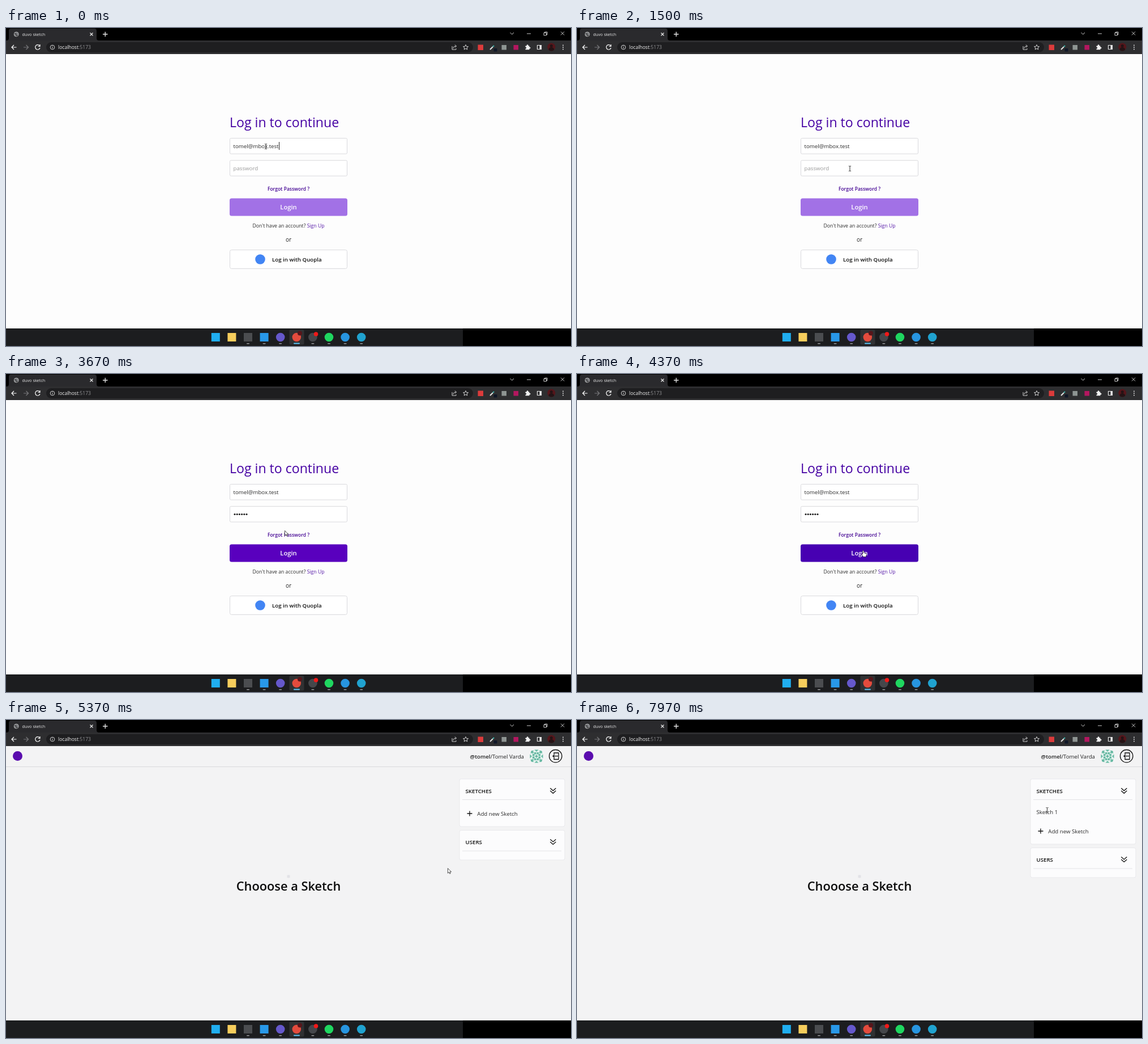
Write an HTML page that moves like this. It is 998 px wide and 561 px high and loops after 8 s.

```html
<!DOCTYPE html>
<html lang="en">
<head>
<meta charset="utf-8">
<title>Login and sketch list</title>
<style>
html, body { margin: 0; height: 100%; overflow: hidden; background: #000; }
svg { display: block; width: 998px; height: 561px; font: 9.7px "Open Sans", "Noto Sans", sans-serif; }
.line { fill: none; stroke: #e4e4e4; stroke-width: 1.2; }
.ink { fill: none; stroke: #111; stroke-width: 1.3; }
.field { fill: #fff; stroke: #dadadd; }
.card { fill: #fcfcfd; stroke: #e9e9ec; }
.semi { font-weight: 600; }
.mid { text-anchor: middle; }
</style>
</head>
<body>
<svg viewBox="0 0 998 561">
  <defs>
    <path id="chevrons" class="ink" d="M-5-4.5 0 0 5-4.5M-5 0 0 4.5 5 0"/>
    <g id="text">
      <path d="M-2-4.5Q0-4.5 0-3.5Q0-4.5 2-4.5M0-3.5V3.5M-2 4.5Q0 4.5 0 3.5Q0 4.5 2 4.5" fill="none" stroke="#333"/>
    </g>
    <path id="arrow" d="M0 0V8.6L2 6.8 3.4 9.6 4.8 9 3.5 6.3H6.2Z" fill="#fff" stroke="#222" stroke-width=".8"/>
    <path id="hand" d="M-1 .8Q0-.6 1 .8V4L5 5Q6 5.3 5.7 7L5 11H.2L-2.6 7.2Q-3 5.6-1 6.4Z" fill="#fff" stroke="#222" stroke-width=".7"/>
  </defs>

  <!-- Browser window -->
  <rect width="998" height="561"/>
  <rect y="22" width="998" height="24" fill="#2e2e30"/>
  <path d="M1 22Q5 22 5 18V5Q5 1 9 1H156Q160 1 160 5V18Q160 22 164 22Z" fill="#2a2a2d"/>
  <rect x="71" y="25" width="754" height="18" rx="9" fill="#1e1e20"/>
  <g class="line">
    <circle cx="18.2" cy="11" r="4" fill="#77797d" stroke="#c8c8c8" stroke-width=".8"/>
    <path d="M14.5 10Q18 9 18 12T21 13" stroke="#333"/>
    <path d="M148.500 8.500l5 5m0-5l-5 5M171 11h8.500M175.250 6.750v8.500" stroke-width="1.4"/>
    <path d="M18.500 34H10m4-4-4 4 4 4" stroke="#fff"/>
    <path d="M31 34h8.500m-4-4 4 4-4 4" stroke="#77777a"/>
    <path d="M59.500 31.500A4.200 4.200 0 1 0 60 35M60 29v3.500h-3.500" stroke="#fff"/>
    <circle cx="82" cy="34" r="3.8" stroke-width=".9"/>
    <path d="M82 33.500v2.500M82 31.500v1" stroke-width="1"/>
    <path d="M788 32v6h7v-2M790 36q0-4 5-4m-2-2.500 2.500 2.500-2.500 2.500" stroke-width=".9"/>
    <path d="M812 29.500l1.300 3 3.200.3-2.400 2.100.7 3.100-2.800-1.700-2.800 1.700.7-3.100-2.400-2.100 3.200-.3Z" stroke-width=".9"/>
    <path d="M890.500 8l3.300 3.300L897 8M920 10h7M980 6.500l6 6m0-6l-6 6" stroke-width=".9"/>
    <path d="M950 8.500h4.500v4.500H950ZM951.500 8.500V7H956v4.500h-1.500" stroke-width=".9"/>
    <path d="M938.500 30.500h7v7h-7Z"/><path d="M944 31v6" stroke-width="3"/>
    <path d="M855 38l5-5" stroke-width="2"/><path d="M860 33l2-2" stroke="#3aa7a0" stroke-width="2.400"/>
    <path d="M917.500 31.500h2.300a1.500 1.500 0 1 1 2.600 0h2v2.300a1.400 1.400 0 1 1 0 2.500v2h-6.900v-2a1.300 1.300 0 1 0 0-2.500Z" fill="#f2f2f2" stroke="none"/>
  </g>
  <rect x="833.500" y="29.500" width="9.500" height="9.500" fill="#dc3b3b"/>
  <rect x="861.500" y="36" width="6" height="5.500" rx="1" fill="#101828"/>
  <rect x="875.500" y="30" width="8.500" height="8.500" fill="#8e9492"/>
  <rect x="896.500" y="30" width="8.500" height="8.500" fill="#b3175f"/>
  <circle cx="963.300" cy="33.500" r="7" fill="#55161b"/>
  <path d="M958.500 38.500q0-4.500 4.800-4.500t4.800 4.500a7 7 0 0 1-9.600 0" fill="#241315"/>
  <circle cx="963.300" cy="31.500" r="2.500" fill="#241315"/>
  <path d="M984 30.500h.01M984 34h.01M984 37.500h.01" stroke="#eee" stroke-width="1.8" stroke-linecap="round"/>
  <text x="28.500" y="13.600" font-size="7.300" fill="#e8e8e8">duvo sketch</text>
  <text x="92" y="37" font-size="8.600" fill="#f2f2f2">localhost<tspan fill="#929295">:5173</tspan></text>

  <!-- Login page -->
  <g id="login">
    <rect y="46" width="998" height="484" fill="#fdfdfd"/>
    <text x="395" y="175" font-size="23.100" font-weight="500" fill="#4500a3">Log in to continue</text>
    <rect class="field" x="395.500" y="194.500" width="207" height="27.500" rx="2"/>
    <rect class="field" x="395.500" y="233.500" width="207" height="27.500" rx="2"/>
    <text x="401.500" y="211.800" fill="#2b2b2b">tomel@mbox.test</text>
    <text id="placeholder" x="401.500" y="250.800" fill="#999">password</text>
    <g id="dots"></g>
    <rect id="caret" width="1" height="14" fill="#222"/>
    <text class="mid semi" x="499" y="287" font-size="8.500" fill="#430393">Forgot Password ?</text>
    <rect id="button" x="395" y="300.500" width="208" height="31" rx="3.500"/>
    <text class="mid semi" x="499" y="320" font-size="11.200" fill="#fff">Login</text>
    <text class="mid" x="499" y="352.200" font-size="8.700" fill="#2b2b2b">Don't have an account? <tspan fill="#5619a8">Sign Up</tspan></text>
    <text class="mid" x="499" y="377" font-size="10" fill="#222">or</text>
    <rect class="field" x="395.500" y="391.500" width="207" height="33" rx="3"/>
    <circle cx="449" cy="408" r="8.800" fill="#4285f4"/>
    <text class="semi" x="470" y="411.600" fill="#111">Log in with Quopla</text>
  </g>

  <!-- Sketch page -->
  <g id="board">
    <rect y="46" width="998" height="484" fill="#f3f3f4"/>
    <path d="M0 82.500H998" stroke="#d9d9dc"/>
    <circle cx="20.500" cy="63.500" r="8.500" fill="#5a0cae"/>
    <text x="915" y="68" text-anchor="end" fill="#222"><tspan class="semi">@tomel</tspan>/Tomel Varda</text>
    <g id="avatar" transform="translate(937 64)" fill="#68b9a3"><circle r="12" fill="#e5f3ef"/></g>
    <circle class="ink" cx="970.700" cy="63.700" r="11.200"/>
    <path class="ink" d="M968 60.500V58h8v11.500h-8V67M975 63.700h-9m2.800-2.800-2.800 2.800 2.800 2.800"/>
    <rect x="496.500" y="273.500" width="5" height="5" rx="1" fill="#e2e2e7"/>
    <text class="mid semi" x="499" y="300.500" font-size="21.800" fill="#0c0c0c">Chooose a Sketch</text>
    <rect id="list" class="card" x="801" y="104" width="186" rx="3"/>
    <path d="M806 140.500H981" stroke="#e3e3e6"/>
    <text class="semi" x="811.500" y="128.700" fill="#111">SKETCHES</text>
    <use href="#chevrons" x="966.300" y="124.800"/>
    <text id="item" x="811.500" y="166" fill="#2b2b2b">Sketch 1</text>
    <g id="below">
      <path class="ink" d="M814.500 165h9M819 160.500v9"/>
      <text x="832.300" y="168.800" fill="#2b2b2b">Add new Sketch</text>
      <rect class="card" x="801" y="194.500" width="186" height="52.500" rx="3"/>
      <path d="M806 231H981" stroke="#e3e3e6"/>
      <text class="semi" x="811.500" y="219" fill="#111">USERS</text>
      <use href="#chevrons" x="966.300" y="215"/>
    </g>
  </g>

  <!-- Taskbar -->
  <rect y="530" width="807" height="31" fill="#1c1d1f"/>
  <rect x="500.500" y="532.500" width="26" height="26" rx="2" fill="#303133"/>
  <g id="apps"></g>
  <rect x="508" y="555.500" width="11" height="2" rx="1" fill="#5cc4f5"/>
  <circle cx="519" cy="538.500" r="4" fill="#55161b"/>
  <circle cx="547.500" cy="540" r="3.800" fill="#f01818"/>
  <use id="cursor"/>
</svg>
<script>
const LOOP = 8000;
const $ = id => document.getElementById(id);
const set = (el, attrs) => { for (const k in attrs) el.setAttribute(k, attrs[k]); return el; };
const add = (parent, tag, attrs) =>
  parent.appendChild(set(document.createElementNS('http://www.w3.org/2000/svg', tag), attrs));
const show = (id, on) => set($(id), { visibility: on ? 'inherit' : 'hidden' });
const clamp = v => Math.min(1, Math.max(0, v));
const smooth = v => v * v * (3 - 2 * v);
const inside = (x, y, l, t, r, b) => x >= l && x <= r && y >= t && y <= b;

const keyTimes = [1930, 2130, 2370, 2600, 2800, 3000];
const dots = keyTimes.map((_, i) => add($('dots'), 'circle', { cx: 404 + i * 4.2, cy: 247.5, r: 1.6, fill: '#222' }));

// Square icons first, then round ones
['#20aef0', '#f6cd5c', '#4b4d50', '#2898e8', '#6558cb', '#e34b3d', '#45474b', '#1fd760', '#2795e0', '#20a2cf']
  .forEach((fill, i) => {
    const x = 370.3 + i * 28.6, icons = $('apps');
    if (i < 4) add(icons, 'rect', { x: x - 7.5, y: 538, width: 15, height: 15, fill });
    else add(icons, 'circle', { cx: x, cy: 545.5, r: 7.8, fill });
    if (i > 1 && i !== 5) add(icons, 'rect', { x: x - 2.5, y: 556, width: 5, height: 1.5, rx: .7, fill: '#98999b' });
  });

for (let a = 0; a < 360; a += 90) {
  add($('avatar'), 'path', {
    transform: `rotate(${a})`,
    d: 'M-3.5-11.5 0-8 3.500-11.500ZM-4-7h3.500v3.500H-4ZM.5-7H4v3.500H.5ZM4.500-10l5.500 5.500V-8.500L8-10ZM4.500-6.500l2 2 2-2-2-2ZM0-2.800 2.800 0H0Z'
  });
}

// Pointer stops: time, x, y
const stops = [
  [30, 459, 209], [830, 482, 248], [3300, 482, 248], [4100, 505.5, 311.5], [4530, 505.5, 311.5],
  [5330, 781.5, 260.5], [5560, 768, 274], [6000, 955, 135], [6170, 931, 124], [6600, 866, 168.5],
  [7430, 866, 168.5], [7650, 860, 190], [7970, 830.5, 159]
];

function pointerAt(t) {
  const i = stops.findIndex(s => s[0] > t);
  if (i < 1) return stops[i ? stops.length - 1 : 0].slice(1);
  const [t0, x0, y0] = stops[i - 1], [t1, x1, y1] = stops[i];
  const k = smooth((t - t0) / (t1 - t0));
  return [x0 + (x1 - x0) * k, y0 + (y1 - y0) * k];
}

function pointerShape(x, y, login, shift) {
  if (login) {
    if (inside(x, y, 395, 300, 603, 331)) return 'hand';
    return inside(x, y, 395, 194, 603, 222) || inside(x, y, 395, 233, 603, 261) ? 'text' : 'arrow';
  }
  const overText = inside(x, y, 832, 158 + shift, 906, 172 + shift) ||
    (shift && inside(x, y, 806, 152, 981, 173));
  return overText ? 'text' : 'arrow';
}

function buttonColor(t) {
  const enabled = clamp((t - 1930) / 200), hover = clamp((t - 4030) / 200);
  const base = [162, 113, 230], active = [89, 0, 190], dark = [71, 0, 178];
  return `rgb(${base.map((c, i) => c + (active[i] - c) * enabled + (dark[i] - active[i]) * hover)})`;
}

function render(t) {
  const login = t < 4530, added = t >= 7170, shift = added ? 31 : 0;
  const typed = keyTimes.filter(k => t >= k).length;
  show('login', login);
  show('board', !login);

  dots.forEach((dot, i) => set(dot, { visibility: i < typed ? 'inherit' : 'hidden' }));
  show('placeholder', !typed);
  const inEmail = t < 870;
  const blinkedOff = (t >= 1500 && t < 1930) || (t >= 3500 && t < 4000) || t >= 4370;
  show('caret', !blinkedOff);
  set($('caret'), inEmail
    ? { x: 402 + $('login').querySelectorAll('text')[1].getComputedTextLength(), y: 201 }
    : { x: 401.5 + typed * 4.2, y: 240 });
  set($('button'), { fill: buttonColor(t) });

  show('item', added);
  set($('list'), { height: 84 + shift });
  set($('below'), { transform: `translate(0 ${shift})` });

  const [x, y] = pointerAt(t);
  set($('cursor'), { href: '#' + pointerShape(x, y, login, shift), x, y });
}

function frame(now) {
  render(now % LOOP);
  requestAnimationFrame(frame);
}
requestAnimationFrame(frame);
</script>
</body>
</html>
```
